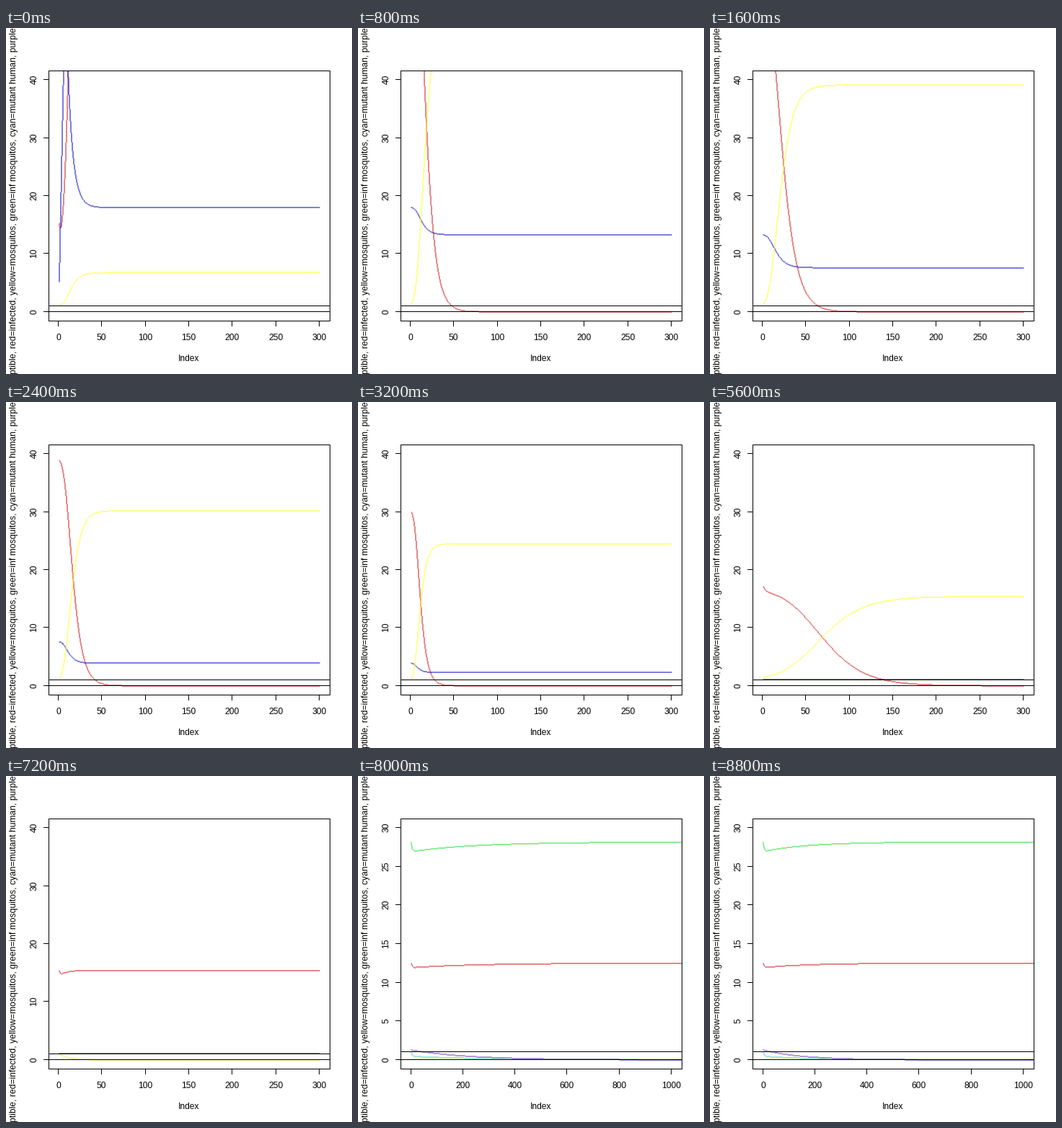
Write a matplotlib script that moves like this. It is 480 by 480 pixels and loops after 9600 ms.

```python
import numpy as np
import matplotlib.pyplot as plt
from matplotlib.animation import FuncAnimation

plt.rcParams["font.family"] = ["Liberation Sans"]
SIZE, DPI = 480, 100
PX = 72 / DPI
LEFT, RIGHT, TOP, BOTTOM = 59, 449, 59, 406
COLORS = {"red": "#cc1414", "blue": "#0000c0", "yellow": "#ffff20",
          "green": "#22dd33", "cyan": "#40d0c8", "purple": "#7030c0"}
YLABEL = ("ptible, red=infected, yellow=mosquitos, green=inf mosquitos, "
          "cyan=mutant human, purple")


def decay(x, tau):
    return np.exp(-(x - 1) / tau)


def growth(x, rate, mid, nu=.01):
    """Richards curve from 0 to 1; a small nu gives the Gompertz shape."""
    return (1 + nu * np.exp(-rate * (x - mid))) ** (-1 / nu)


def outbreak(x):
    return {"red": 14.2 + .8 * decay(x, .7) + .315 * (x - 2) ** 2,
            "blue": np.minimum(5 + 7.4 * (x - 1), 18 + 150 * np.exp(-.167 * x)),
            "yellow": 1 + 5.75 * growth(x, .15, 12)}


def invasion(red, yellow, blue_from, blue_to, rate, mid, lag=1, drop=0, nu=.01):
    """The mutant (yellow) replaces the resident (red)."""
    def curves(x):
        def share(stretch):
            return growth(x, rate / stretch, mid * stretch, nu)
        return {"red": (red - drop) * (1 - share(lag)) + drop * decay(x, 2),
                "blue": blue_from + (blue_to - blue_from) * share(.75),
                "yellow": 1 + (yellow - 1) * share(1)}
    return curves


def rejection(tau):
    """The mutant dies out and the resident recovers."""
    def curves(x):
        left = decay(x, tau)
        return {"red": 15.45 - .9 * (left - decay(x, tau / 11)),
                "blue": np.full_like(x, 1.1), "yellow": left}
    return curves


def two_species(tau):
    """Mutants of both species die out."""
    def curves(x):
        slow, fast = decay(x, tau), decay(x, 3)
        return {"yellow": np.full_like(x, .05),
                "red": 12.5 - .58 * (slow - fast),
                "green": 28.2 - 1.25 * (slow - fast),
                "cyan": .45 * slow + .55 * fast,
                "purple": 1.27 * decay(x, .88 * tau) - .02}
    return curves


SCENES = [
    outbreak,
    invasion(75, 55, 18, 13.3, .13, 14),
    invasion(55, 39.15, 13.3, 7.6, .1017, 16.9, lag=1.13),
    invasion(39.15, 30.2, 7.6, 3.9, .14, 12.5, lag=1.08),
    invasion(30.2, 24.5, 3.9, 2.3, .195, 9.1, lag=1.04),
    invasion(24.5, 20.5, 2.3, 1.4, .15, 12),
    invasion(20.5, 17.7, 1.4, 1.1, .115, 16.4, drop=1.3),
    invasion(17.7, 15.4, 1.1, 1.1, .0362, 63, drop=.9, nu=.5),
    rejection(27),
    rejection(9),
    two_species(250),
    two_species(170),
]

fig = plt.figure(figsize=(SIZE / DPI, SIZE / DPI), dpi=DPI, facecolor="white")
ax = fig.add_axes([0, 0, 1, 1])


def stroke(x, y, **kw):
    ax.plot(x, y, color="black", lw=PX, antialiased=False, **kw)


def pixel_curve(columns, edge_y, color):
    """One-pixel stepped line: each column spans the rows the curve crosses."""
    rows = np.floor(edge_y)
    top = np.minimum(rows[:-1], rows[1:])
    bottom = np.maximum(top + 1, np.maximum(rows[:-1], rows[1:]))
    top, bottom = (np.clip(v, TOP, BOTTOM) for v in (top, bottom))
    ax.fill_between(np.append(columns, columns[-1] + 1), np.append(top, top[-1]),
                    np.append(bottom, bottom[-1]), step="post", color=color,
                    lw=0, zorder=2)


def label(x, y, text, rotation=0, ha="center", size=12):
    ax.text(x, y, text, rotation=rotation, rotation_mode="anchor", ha=ha,
            va="baseline", fontsize=size * PX)


def draw(frame):
    ax.clear()
    ax.set(xlim=(0, SIZE), ylim=(SIZE, 0))
    ax.axis("off")
    wide = frame >= 10
    x_max, x_step = (1000, 200) if wide else (300, 50)
    y_max, y_step = (30, 5) if wide else (40, 10)
    pad = .04 / 1.08
    x_scale = (RIGHT - LEFT) / (1.08 * (x_max - 1))
    x_first = LEFT + pad * (RIGHT - LEFT)

    def to_x(v):
        return int(x_first + (v - 1) * x_scale)

    def to_y(v):
        return BOTTOM - (BOTTOM - TOP) * (v / (1.08 * y_max) + pad)

    columns = np.arange(to_x(1), RIGHT if wide else to_x(x_max) + 1)
    edges = np.append(columns, columns[-1] + 1)
    index = np.maximum(1, 1 + (edges - x_first) / x_scale)
    for name, values in SCENES[frame](index).items():
        pixel_curve(columns, to_y(values), COLORS[name])

    for value in (0, 1):
        y = int(to_y(value))
        stroke([LEFT, RIGHT], [y, y], zorder=3)
    stroke([LEFT, RIGHT, RIGHT, LEFT, LEFT], [TOP, TOP, BOTTOM, BOTTOM, TOP], zorder=3)

    for v in range(0, x_max + 1, x_step):
        x = to_x(v)
        stroke([x, x], [BOTTOM, BOTTOM + 7])
        label(x + .5, 433, str(v))
    for v in range(0, y_max + 1, y_step):
        y = int(to_y(v))
        stroke([LEFT - 7, LEFT], [y, y])
        label(42.5, y + .5, str(v), 90)
    label(254, 462, "Index")
    label(14, SIZE, YLABEL, 90, "left", 12.15)
    return ax.get_children()


anim = FuncAnimation(fig, draw, frames=len(SCENES), interval=800, repeat=True,
                     init_func=lambda: draw(0), blit=False)
plt.show()
```
